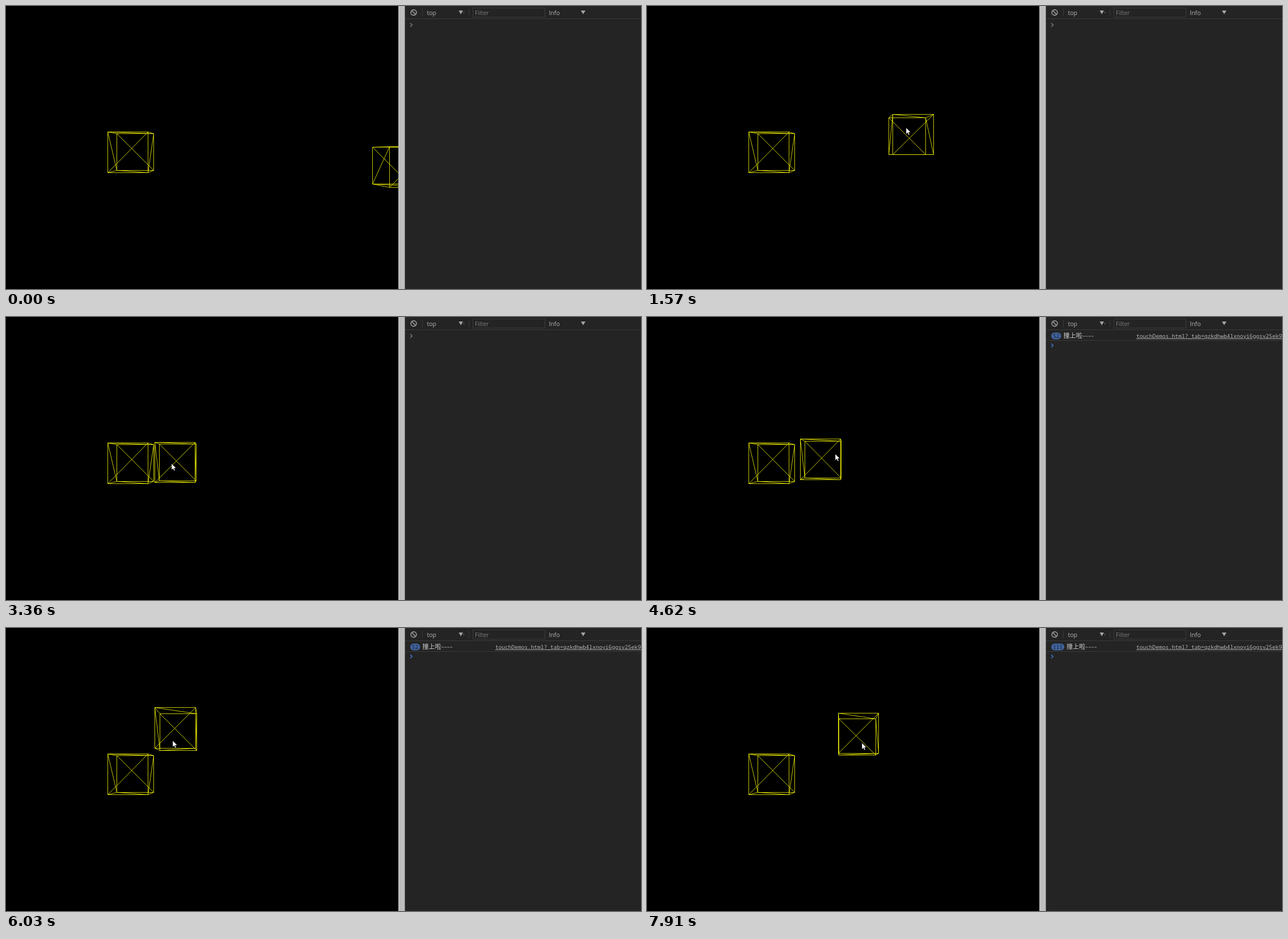
Recreate the animation shown at these times as an HTML page with a canvas. Size 1120 by 500 pixels, loop 7.99 s.

```html
<!DOCTYPE html>
<html lang="en">
<head>
<meta charset="utf-8">
<title>Box collision</title>
<style>
  html, body { margin: 0; width: 100%; height: 100%; overflow: hidden; background: #000; }
  canvas, svg { position: absolute; left: 0; top: 0; display: block; }
  .ui { font: 10.5px "Open Sans", "Noto Sans", sans-serif; fill: #b5b5b5; }
  .msg { font: 11px "Noto Sans CJK SC", "Noto Sans CJK", sans-serif; fill: #d0d0d0; }
  .mono { font: 9.52px "Noto Sans Mono", "DejaVu Sans Mono", monospace; }
  .rule { stroke: #3a3a3a; shape-rendering: crispEdges; }
</style>
</head>
<body>
<canvas id="scene" width="693" height="500"></canvas>
<svg width="1120" height="500" viewBox="0 0 1120 500">
  <rect x="692" width="12" height="500" fill="#bebebe"/>
  <rect x="703.5" width="417" height="500" fill="#242424"/>
  <path class="rule" d="M704 22.5H1120M734.5 5V18M816.5 5V18"/>
  <g fill="none" stroke="#9a9a9a" stroke-width="1.6">
    <circle cx="719" cy="11.5" r="4.9"/>
    <path d="M715.6 8.1L722.4 14.9"/>
  </g>
  <text class="ui" x="742.5" y="15.5">top</text>
  <path d="M798.5 8H806L802.2 14.5ZM1014 8H1022L1018 14.5Z" fill="#a5a5a5"/>
  <rect x="807" y="10" width="1" height="3" fill="#666"/>
  <rect x="823.5" y="3.5" width="127" height="16" fill="none" stroke="#3a3a3a"/>
  <text class="ui" x="827" y="15.5" style="fill:#7d7d7d">Filter</text>
  <text class="ui" x="957.5" y="15.5">Info</text>
  <g id="log">
    <rect id="pill" x="713" y="27.5" height="12" rx="6" fill="#40639f"/>
    <text id="num" class="mono" y="37" text-anchor="middle" fill="#202020"></text>
    <text id="msg" class="msg" y="37.3">撞上啦<tspan class="mono" style="font-size:8.5px">~~~~</tspan></text>
    <text class="mono" x="863" y="36.8" fill="#b4b4b4" text-decoration="underline">touchDemos.html?_tab=qzkdhwb4lxnoyi6ggsv25ek9</text>
    <path class="rule" d="M704 41.5H1120"/>
  </g>
  <path id="prompt" d="M713 30.3L716.3 33.5L713 36.7" fill="none" stroke-width="1.5"/>
  <path id="mouse" d="M0 0V11.2L2.6 8.8L4.4 12.8L6.2 12L4.5 8.1H8Z" fill="#fff" stroke="#000" stroke-width=".5"/>
</svg>
<script>
const LOOP = 7990;
const SIZE = 71.5, DEPTH = 0.906, VX = 356.5, VY = 257;

// Drag stops of the moving box: time, x, y
const stops = [
  [0, 676.5, 248.5], [390, 676.5, 248.5], [790, 515, 255], [940, 507, 232.5],
  [1640, 426, 187], [2280, 306, 221], [2900, 253, 222], [3210, 262, 221],
  [3600, 262, 221], [3700, 248, 222], [4440, 248, 220], [4620, 270, 216],
  [5320, 301, 147], [5510, 286.5, 134], [6180, 256, 143], [6660, 236, 154],
  [7530, 240, 155], [7910, 337, 150]
];

// Where the pointer holds the box: time, dx, dy
const grips = [
  [0, 358, 262], [390, 23, 24], [2000, 30, 38],
  [3920, 62, 26], [4950, 29, 59], [6300, 42, 53]
];
const REGRIP = 320;

const $ = id => document.getElementById(id);
const ctx = $('scene').getContext('2d');
const clamp = v => Math.max(0, Math.min(1, v));
const lerp = (a, b, u) => a + (b - a) * u;

// Position at t; each key is reached during the last `span` ms before it
function at(keys, t, span = Infinity) {
  const i = keys.findIndex(k => k[0] > t);
  if (i < 0) return keys[keys.length - 1].slice(1);
  const [ta, xa, ya] = keys[i - 1], [tb, xb, yb] = keys[i];
  const u = clamp(1 - (tb - t) / Math.min(span, tb - ta));
  return [lerp(xa, xb, u), lerp(ya, yb, u)];
}

const snap = v => Math.floor(v) + 0.5;

function line(a, b) {
  ctx.moveTo(snap(a[0]), snap(a[1]));
  ctx.lineTo(snap(b[0]), snap(b[1]));
}

function box(x, y) {
  const front = [[x, y], [x + SIZE, y], [x + SIZE, y + SIZE], [x, y + SIZE]];
  const back = front.map(([px, py]) => [lerp(VX, px, DEPTH), lerp(VY, py, DEPTH)]);
  ctx.beginPath();
  for (let i = 0; i < 4; i++) {
    const j = (i + 1) % 4;
    line(front[i], front[j]);
    line(back[i], back[j]);
    line(front[i], back[i]);
  }
  // One diagonal per face
  line(front[3], front[1]);
  line(back[0], back[2]);
  for (const i of [0, 2]) {
    line(front[i], back[1]);
    line(front[i], back[3]);
  }
  ctx.stroke();
}

// Two collisions, each logging at a steady rate
function hits(t) {
  if (t < 3670) return 0;
  return Math.round(3 + 49 * clamp((t - 3680) / 870) + 59 * clamp((t - 6580) / 950));
}

function drawLog(n) {
  const w = 6 + 5.7 * String(n).length;
  $('log').style.display = n ? '' : 'none';
  $('prompt').setAttribute('transform', `translate(0 ${n ? 16.8 : 0})`);
  $('prompt').setAttribute('stroke', n ? '#3f73c4' : '#7a7a7a');
  $('pill').setAttribute('width', w);
  $('num').setAttribute('x', 713 + w / 2);
  $('num').textContent = n;
  $('msg').setAttribute('x', 717 + w);
}

function draw(t) {
  const [x, y] = at(stops, t), [dx, dy] = at(grips, t, REGRIP);
  ctx.fillStyle = '#000';
  ctx.fillRect(0, 0, 693, 500);
  ctx.strokeStyle = '#e6e600';
  ctx.lineWidth = 0.85;
  box(179, 222.5);
  box(x, y);
  drawLog(hits(t));
  $('mouse').setAttribute('transform', `translate(${Math.round(x + dx)} ${Math.round(y + dy)})`);
}

const start = performance.now();
function tick() {
  draw((performance.now() - start) % LOOP);
  requestAnimationFrame(tick);
}
tick();
</script>
</body>
</html>
```
